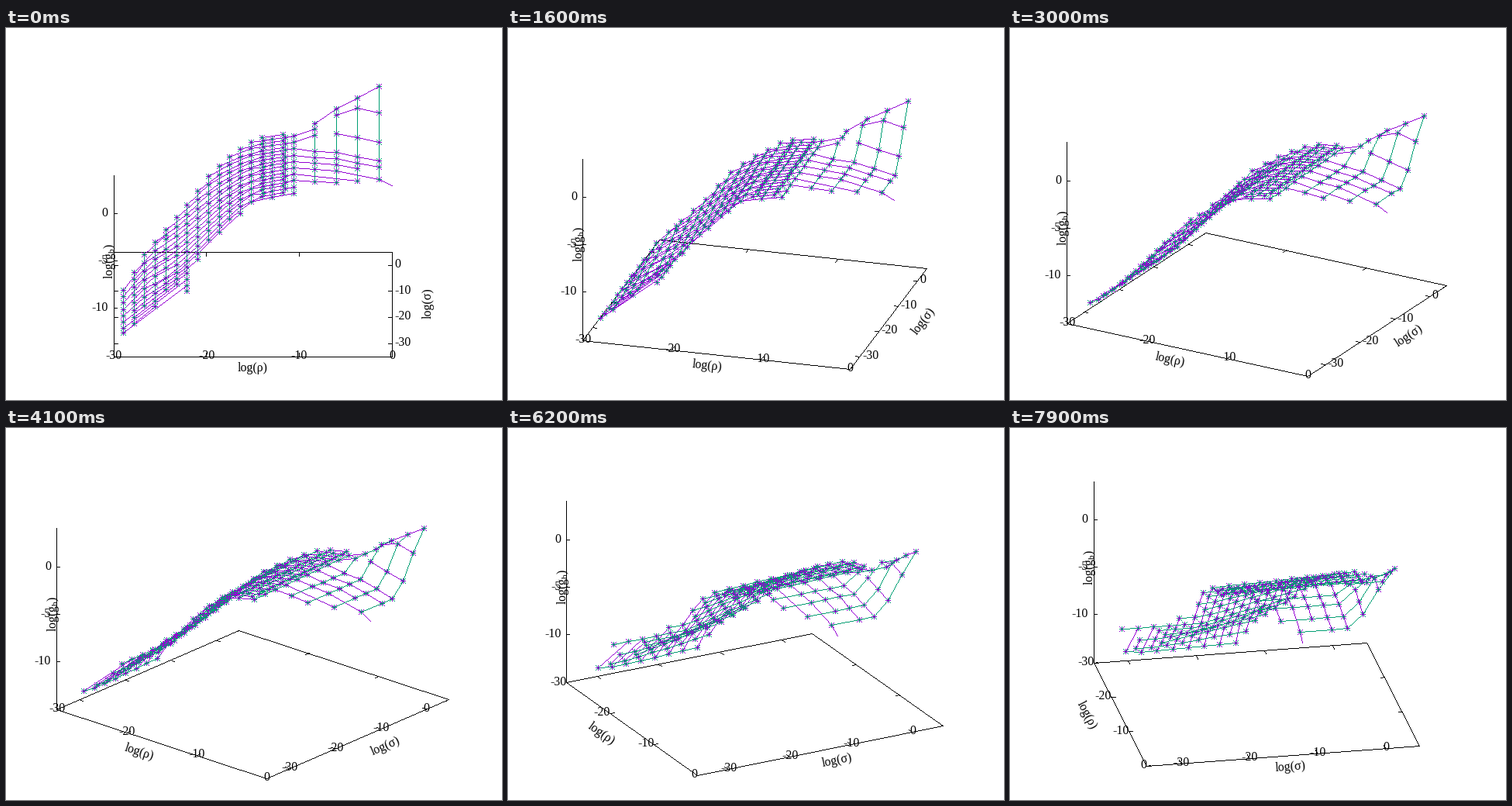
A matplotlib script for the animation above (8000 ms loop, 640 by 480 pixels).

```python
import numpy as np
import matplotlib.pyplot as plt
from matplotlib.animation import FuncAnimation

W, H, DPI = 640, 480, 100
FRAMES, STEP_MS = 80, 100
BLACK, PURPLE, GREEN = (0, 0, 0), (148, 0, 211), (0, 158, 115)
CX, CY, RX, RY = 318.6, 356.8, 179.4, 67.6
Z_LEN, Z_MIN, Z_UNIT = 234, -15.12, 12.2

plt.rcParams.update({
    "font.family": "Liberation Serif",
    "font.size": 16 * 72 / DPI,
    "mathtext.fontset": "custom",
    "mathtext.rm": "Liberation Serif",
})


def height(m, j, first):
    """Surface height: a plateau along m that rises towards small j."""
    plateau = np.interp(m, [0, 4, 8, 12, 14, 18, 24],
                        [151, 162, 165, 154, 132, 77.5, 14])
    if m < 8:
        return plateau + min(74 - 10 * m, np.interp(j, [0, 1, 2, 3], [74, 48, 18, 1]))
    rise = np.interp(m, [8, 12, 16, 22, 24], [4, 7, 28, 20, 3])
    knee = 12 if m > 20 else 10
    return plateau + rise * max(0, (knee - j) / (knee - first))


def steps(m):
    """Sigma steps sampled in a density column; odd columns sit half a step off."""
    if m < 8:
        last = min(6 + m // 2, 8)
        return [j for j in range(last + 1) if j != last - 1]
    odd = m % 2
    first = max(1 - odd / 2, m / 2 - 5)
    last = 15 if m == 18 else max(10, .35 * m + 5.2 + odd)
    return np.arange(first, last + .01)


def build_points():
    pts = []
    for m in [0, 2, 4, 6, *range(8, 25)]:
        js = steps(m)
        pts += [(m, j, height(m, j, js[0])) for j in js]
    for m in (9, 11):
        pts += [(m - .2, j, height(m, j, 1)) for j in range(1, 10)]
    # stragglers, and the point where the last row leaves the box
    pts += [(20, 6, 80), (24, 14, 16), (-1.2, 6, 144)]
    return np.array(pts)


def links(key, order):
    """Index pairs joining neighbours that share the same key."""
    pairs = []
    for k in np.unique(key):
        idx = np.flatnonzero(key == k)
        idx = idx[np.argsort(order[idx], kind="stable")]
        pairs += zip(idx[:-1], idx[1:])
    return pairs


M, J, HT = build_points().T
U, V = .908 - .0767 * M, .832 - .11515 * J
COLS = links(M, J)
ROWS = [(a, b) for a, b in links(J, M) if not (J[a] in (1, 2) and M[a] == 4)]
MARKED = np.flatnonzero(M >= 0)
FLIP = np.random.default_rng(3).random(len(MARKED)) < .5
ARM = np.arange(-3, 4)
PLUS = np.concatenate([np.c_[ARM, 0 * ARM], np.c_[0 * ARM, ARM]])
CROSS = np.concatenate([np.c_[ARM, ARM], np.c_[ARM, -ARM]])


def project(u, v, h, angle):
    c, s = np.cos(angle), np.sin(angle)
    return np.stack([CX + RX * (c * u + s * v),
                     CY + RY * (s * u - c * v) - h], axis=-1)


fig = plt.figure(figsize=(W / DPI, H / DPI), dpi=DPI, facecolor="white")
ax = fig.add_axes([0, 0, 1, 1])
canvas = np.full((H, W, 3), 255, np.uint8)
image = ax.imshow(canvas, extent=(0, W, H, 0), aspect="auto", interpolation="nearest")
ax.axis("off")


def plot(pixels, color):
    canvas[pixels[..., 1], pixels[..., 0]] = color


def line(a, b, color=BLACK):
    """One-pixel line without smoothing."""
    a, b = np.floor(a), np.floor(b)
    n = int(np.abs(b - a).max()) + 1
    plot(np.rint(np.linspace(a, b, n)).astype(int), color)


def write(x, y, s, ha="center", va="baseline", rot=0):
    ax.text(x, y, s, ha=ha, va=va, rotation=rot)


def ticks(spot, angle):
    """Inward ticks on both borders; yields each value with its label position."""
    for val in (-30, -20, -10, 0):
        near, far = (project(*spot(val, e), 0, angle) for e in (-1, 1))
        d = (far - near) / np.hypot(*(far - near)) * 5
        line(near, near + d)
        line(far, far - d)
        yield val, *near


def draw_box(angle):
    c, s = np.cos(angle), np.sin(angle)
    base = [project(u, v, 0, angle) for u, v in ((-1, -1), (1, -1), (1, 1), (-1, 1))]
    for i in range(4):
        line(base[i - 1], base[i])

    side = "right" if s > .78 else "center"
    for val, x, y in ticks(lambda r, e: (r / 15 + 1, e), angle):
        write(x, y + 2.7, str(val), side)
    side, dx = ("left", 3) if c > .78 else ("center", 0.5)
    for val, x, y in ticks(lambda q, e: (-e, (q + 15) / 20), angle):
        write(x + dx, y + 2.7, str(val), side)

    x0, y0 = base[0]
    line(base[0], base[0] - (0, Z_LEN))
    for z in (0, -5, -10):
        y = y0 - (z - Z_MIN) * Z_UNIT
        line(np.array([x0, y]), np.array([x0 + 4, y]))
        write(x0 - 7.5, y + 3.5, str(z), "right")

    x, y = (base[0] + base[1]) / 2
    write(x - 45 * s, y + 17 * c - 2, "log(ρ)", va="center",
          rot=-np.degrees(np.arctan2(RY * s, RX * c)))
    x, y = (base[1] + base[2]) / 2
    write(x + 47 * c, y + 17 * s - 2, "log(σ)", va="center",
          rot=np.degrees(np.arctan2(RY * c, RX * s)))
    write(x0 - 5, y0 - Z_LEN / 2 - 7, r"log(g$_{\mathrm{b}}$)", va="center", rot=90)


def draw_net(angle):
    p = project(U, V, HT, angle)
    for pairs, color in ((ROWS, PURPLE), (COLS, GREEN)):
        for a, b in pairs:
            line(p[a], p[b], color)
    # both nets mark the same spots, so every star mixes the two colours
    stars = np.floor(p[MARKED]).astype(int)[:, None]
    for pick, under, over in ((FLIP, PURPLE, GREEN), (~FLIP, GREEN, PURPLE)):
        plot(stars[pick] + CROSS, under)
        plot(stars[pick] + PLUS, over)


def update(n):
    for t in list(ax.texts):
        t.remove()
    canvas[:] = 255
    angle = np.radians(n)
    draw_box(angle)
    draw_net(angle)
    image.set_data(canvas)
    return []


anim = FuncAnimation(fig, update, frames=FRAMES, interval=STEP_MS,
                     init_func=lambda: [], repeat=True, repeat_delay=0, blit=False)
plt.show()
```
